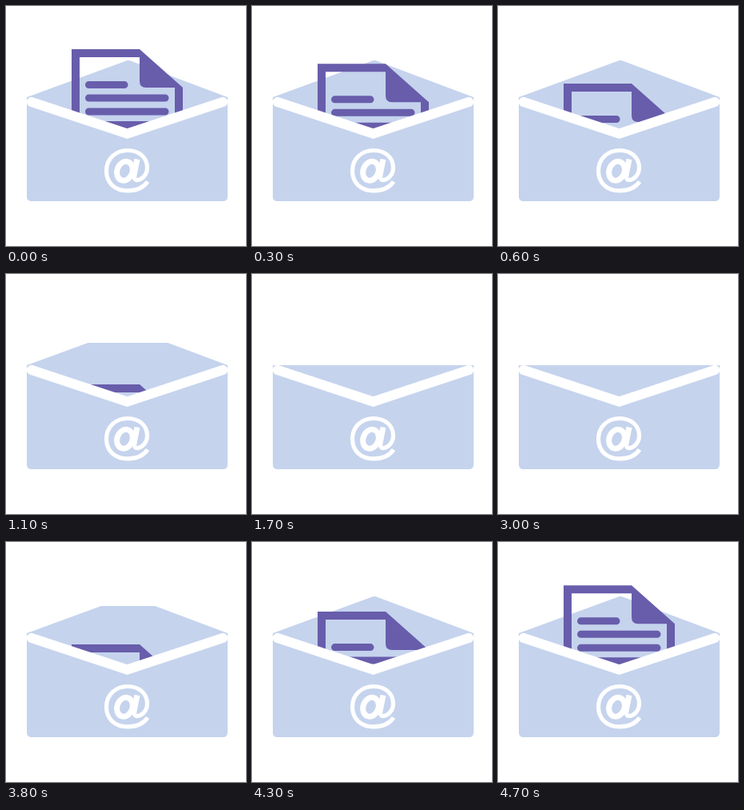
An HTML page for the animation above (5.6 s loop, 300x300 px).

```html
<!DOCTYPE html>
<html lang="en">
<head>
<meta charset="utf-8">
<title>Envelope</title>
<style>
  html, body { margin: 0; width: 100%; height: 100%; overflow: hidden; background: #fff; }
  svg { display: block; width: 100%; height: 100%; }
  .blue { fill: #c5d3ed; }
  .purple { fill: #685dab; }
  .lines { fill: none; stroke: #685dab; stroke-width: 9; stroke-linecap: round; }
  .rim { fill: none; stroke: #fff; stroke-width: 12.3; stroke-linecap: round; }
  #at { fill: none; stroke: #fff; stroke-width: 5.2; }
</style>
</head>
<body>
<svg viewBox="0 0 300 300">
  <defs>
    <clipPath id="flapClip"><rect id="flapRect" width="300" height="300"/></clipPath>
    <clipPath id="mouth"><path d="M0 0H300V110L271 120L151.5 159.5L32 120L0 110Z"/></clipPath>
  </defs>
  <path class="blue" clip-path="url(#flapClip)" d="M26 114L149 69Q153 67 157 69L277 114V116H26Z"/>
  <path class="blue" d="M26 114H277V238Q277 244 271 244H32Q26 244 26 238Z"/>
  <g clip-path="url(#mouth)">
    <g id="letter">
      <path class="purple" fill-rule="evenodd" d="M82 54H167L221 102V154H82Z
        M92 64V144H211V102H175Q167 102 167 94V64Z"/>
      <path class="lines" d="M103.5 98.5H148M103.5 115H199M103.5 132H199"/>
    </g>
  </g>
  <path class="rim" d="M32 120L151.5 159.5L271 120"/>
  <g id="at">
    <path d="M160.5 212Q160 218 164 217.5C170 217 176.5 211 176.5 202C176.5 189 166 180.5 152 180.5
      C137 180.5 125.5 191 125.5 206C125.5 221 136 230.8 152 230.8C163 230.8 172 227 177 219.5"/>
    <path stroke-width="7" d="M164 191.5L159.5 214"/>
    <ellipse stroke-width="7" cx="148.5" cy="206.3" rx="9.5" ry="12.2" transform="rotate(20 148.5 206.3)"/>
  </g>
</svg>
<script>
  const LOOP = 5600, STEP = 100;
  const WHITE = [255, 255, 255], PURPLE = [104, 93, 171];
  const el = id => document.getElementById(id);
  const letter = el('letter'), flap = el('flapRect'), at = el('at');

  // Rows of [time, value], joined linearly
  const letterDrop = [[76, 0], [1296, 100], [3484, 100], [4704, 0]];
  const flapTop = [[740, 68], [1660, 114], [3120, 114], [4040, 68]];
  const tint = [[1700, 0], [2200, 1], [2500, 1], [3000, 0]];

  function valueAt(rows, t) {
    if (t <= rows[0][0]) return rows[0][1];
    for (let i = 1; i < rows.length; i++) {
      const [t0, v0] = rows[i - 1], [t1, v1] = rows[i];
      if (t <= t1) return v0 + (v1 - v0) * (t - t0) / (t1 - t0);
    }
    return rows[rows.length - 1][1];
  }

  function draw(time) {
    const t = Math.floor(time % LOOP / STEP) * STEP;
    const mix = valueAt(tint, t);
    const rgb = WHITE.map((w, i) => Math.round(w + (PURPLE[i] - w) * mix));
    const top = valueAt(flapTop, t);
    letter.setAttribute('transform', `translate(0 ${valueAt(letterDrop, t)})`);
    flap.setAttribute('y', top > 68 ? top : 0);
    at.style.stroke = `rgb(${rgb})`;
  }

  const start = performance.now();
  function tick(now) {
    draw(Math.max(0, now - start));
    requestAnimationFrame(tick);
  }
  draw(0);
  requestAnimationFrame(tick);
</script>
</body>
</html>
```
